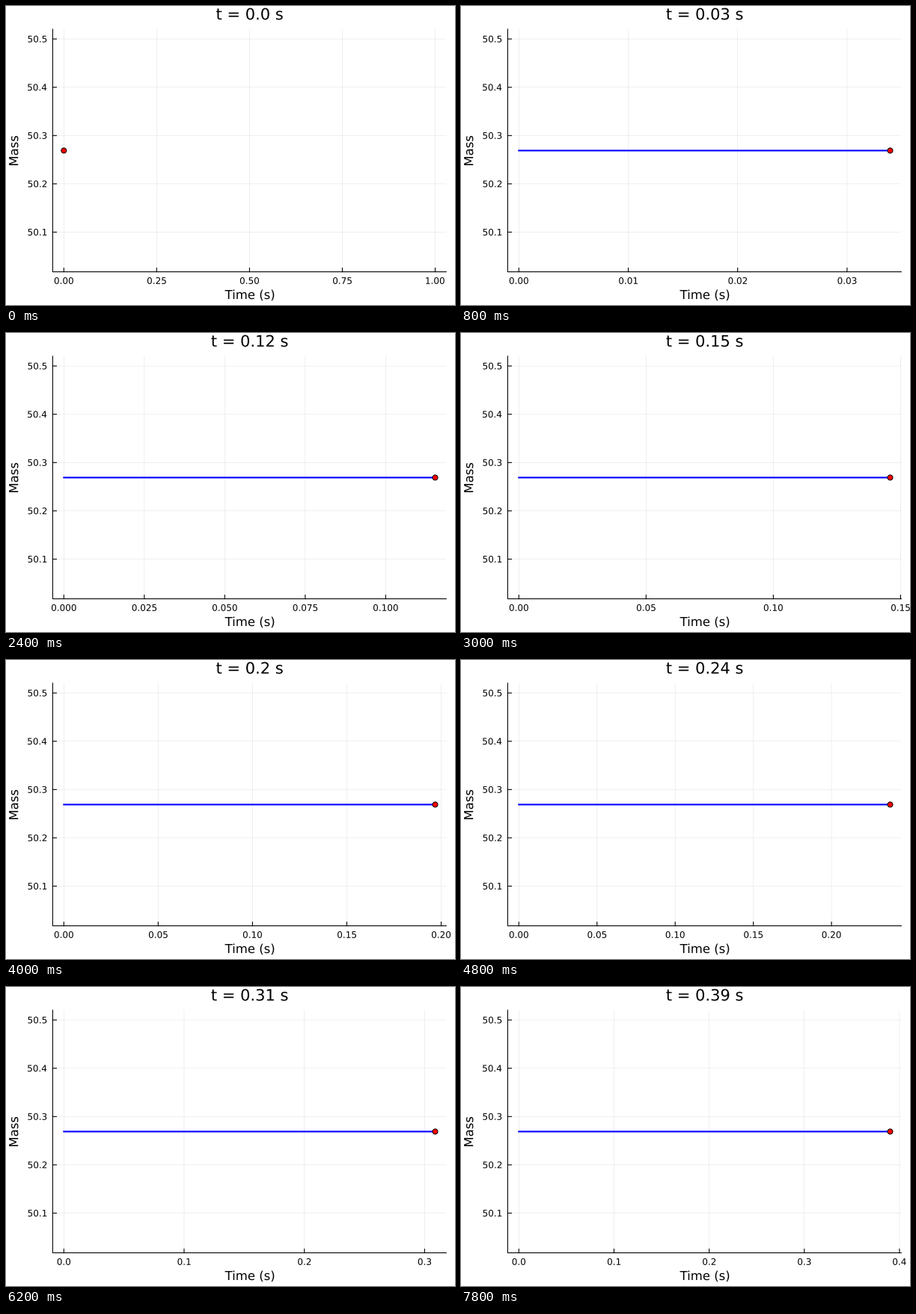
A matplotlib script that plays this animation: 600x400 px, repeating every 8 s.

```python
import math

import matplotlib.pyplot as plt
from matplotlib.animation import FuncAnimation
from matplotlib.patches import Circle, PathPatch
from matplotlib.textpath import TextPath
from matplotlib.transforms import Affine2D

plt.rcParams["font.family"] = "DejaVu Sans"

W, H, DPI = 600, 400, 100
FRAMES, INTERVAL = 40, 200

# Plot area and data scale, in pixels with y pointing down
LEFT, RIGHT, TOP, BOTTOM = 62.4, 588.3, 31.0, 355.6
X0, X_SPAN = 77.3, 496.2
MASS = 50.2689
PX_PER_UNIT = 646.0
MID_X, MID_Y = 325.4, 193.4
SMALL, MEDIUM, LARGE = 12, 16.5, 21

STEP_T = 0.01018
LAG_T = 0.00678
PAD = 0.03
NICE = ((1, 1.0), (5, 0.9), (2, 0.7), (2.5, 0.5), (3, 0.2))

fig = plt.figure(figsize=(W / DPI, H / DPI), dpi=DPI, facecolor="white")
ax = fig.add_axes([0, 0, 1, 1])


def sim_time(i):
    """Solver time: a short start-up step, then equal steps."""
    if i == 0:
        return 0.0
    return 0.0028 if i == 1 else STEP_T * i - LAG_T


def tick_step(span):
    """Best tick distance for an axis from 0 to span, tick count and decimals."""
    top = span * (1 + PAD)
    width = span * (1 + 2 * PAD)
    power = math.floor(math.log10(width))
    options = []
    for z in range(power - 2, power + 1):
        for q, nice in NICE:
            step = q * 10.0 ** z
            n = math.floor(top / step + 1e-9) + 1
            if 4 <= n <= 8:
                density = 1 - abs(n - 5) / 5
                cover = 1.5 * width / ((n - 1) * step)
                score = density / 4 + cover / 3 + nice / 4
                decimals = max(0, -z + (q == 2.5))
                options.append((round(score, 9), step, n, decimals))
    return max(options)[1:]


def line(xs, ys, px=1.1, color="black", **kw):
    ax.plot(xs, ys, color=color, lw=px * 72 / DPI, snap=False, **kw)


def grid(xs, ys):
    line(xs, ys, 0.6, alpha=0.1, zorder=1)


def label(x, y, text, size, align=0.5, angle=0):
    """Outline text with its baseline at y; align 0.5 centres, 1 ends at x."""
    path = TextPath((0, 0), text, size=size)
    box = path.get_extents()
    place = (Affine2D().translate(-box.x0 - align * box.width, 0)
             .rotate_deg(angle).scale(1, -1).translate(x, y))
    ax.add_patch(PathPatch(place.transform_path(path), fc="black", lw=0,
                           snap=False, zorder=5))


def draw_x_ticks(span):
    step, n, decimals = tick_step(span)
    for k in range(n):
        x = X0 + k * step / span * X_SPAN
        grid([x, x], [TOP, BOTTOM])
        line([x, x], [BOTTOM, BOTTOM - 5], zorder=2)
        label(x, 371.8, f"{k * step:.{decimals}f}", SMALL)


def draw_y_ticks():
    for k in range(1, 6):
        value = 50 + k / 10
        y = MID_Y - (value - MASS) * PX_PER_UNIT
        grid([LEFT, RIGHT], [y, y])
        line([LEFT, LEFT + 5], [y, y], zorder=2)
        label(54.2, y + 4.4, f"{value:.1f}", SMALL, align=1)


def draw(i):
    ax.clear()
    ax.set_xlim(0, W)
    ax.set_ylim(H, 0)
    ax.axis("off")

    t = sim_time(i)
    draw_x_ticks(t or 1.0)
    draw_y_ticks()
    line([LEFT, LEFT, RIGHT], [TOP, BOTTOM, BOTTOM], zorder=2)

    x = X0 + (X_SPAN if t else 0)
    if t:
        line([X0, x], [MID_Y, MID_Y], 2.1, "blue", zorder=3)
    ax.add_patch(Circle((x, MID_Y), 3.5, fc="red", ec="black", lw=0.72,
                        snap=False, zorder=4))

    label(MID_X, 18.2, f"t = {round(t, 2)} s", LARGE)
    label(MID_X, 392, "Time (s)", MEDIUM)
    label(16.2, MID_Y, "Mass", MEDIUM, angle=90)
    return []


anim = FuncAnimation(fig, draw, frames=FRAMES, interval=INTERVAL,
                     init_func=lambda: draw(0), repeat=True, repeat_delay=0)
plt.show()
```
